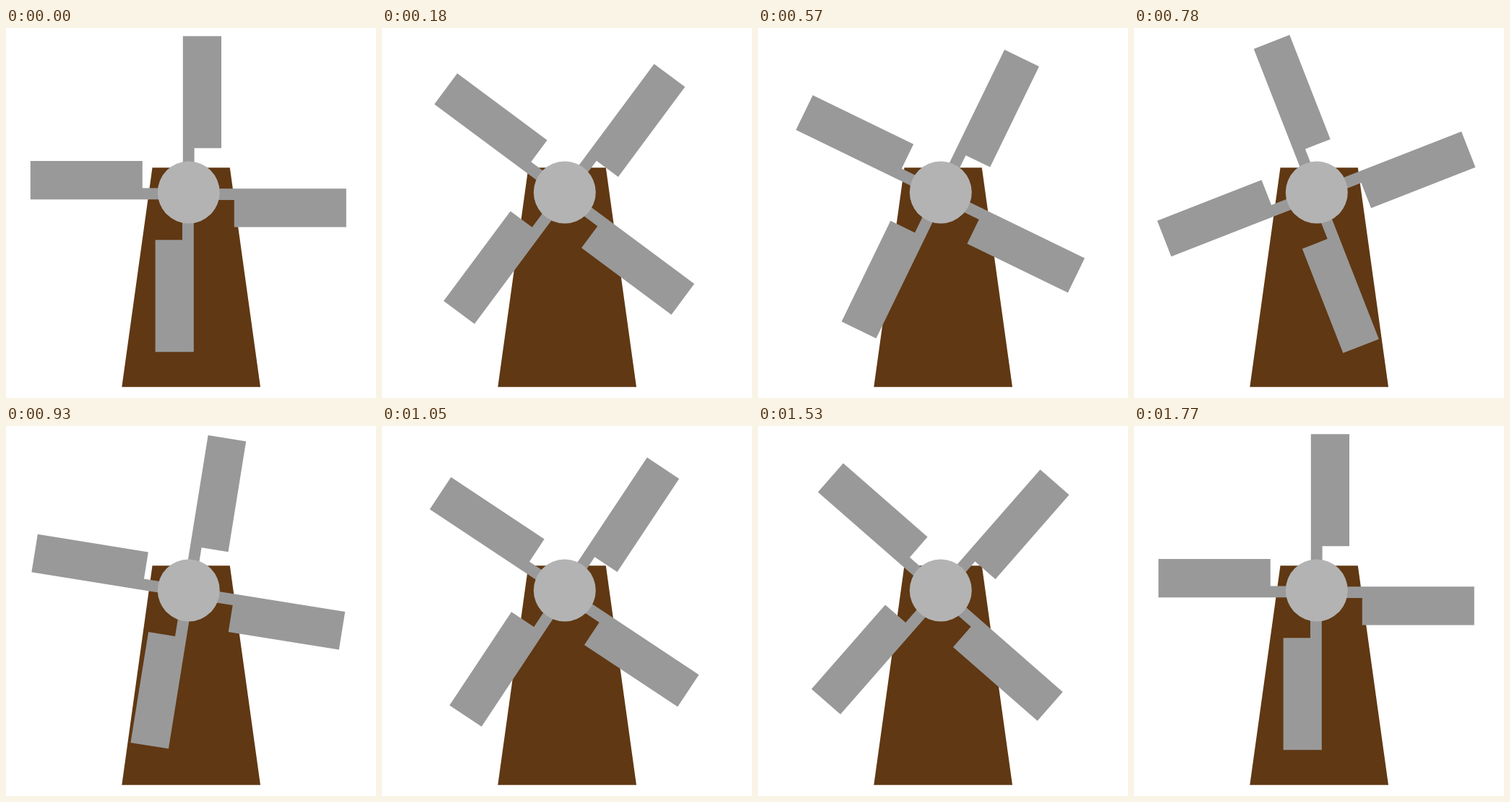
Write an HTML page that moves like this. It is 512 px wide and 512 px high and loops after 1800 ms.

```html
<!DOCTYPE html>
<html lang="en">
<head>
<meta charset="utf-8">
<title>Windmill</title>
<style>
  html, body { margin: 0; width: 100%; height: 100%; overflow: hidden; background: #fff; }
  svg { display: block; width: 100vw; height: 100vh; }
</style>
</head>
<body>
<svg viewBox="0 0 512 512">
  <defs>
    <path id="blade" d="M-7.5 0V-218.5H45.7V-63.5H8.3V0Z"/>
  </defs>
  <path fill="#603813" d="M202.5 193.3H309.8L352 496.8H160.3Z"/>
  <g id="sails" fill="#999">
    <use href="#blade"/>
    <use href="#blade" transform="rotate(90)"/>
    <use href="#blade" transform="rotate(180)"/>
    <use href="#blade" transform="rotate(270)"/>
  </g>
  <circle cx="252.8" cy="227.4" r="43" fill="#b3b3b3"/>
</svg>
<script>
  const STEP = 30, STEPS = 60;
  const sails = document.getElementById('sails');

  // The first and last steps share one pose, so a turn spans STEPS - 1 steps.
  function draw(now) {
    const step = Math.floor(now / STEP) % STEPS;
    const angle = 360 * step / (STEPS - 1);
    sails.setAttribute('transform', `translate(252.3 229.7) rotate(${angle})`);
  }

  const start = performance.now();
  function tick() {
    draw(performance.now() - start);
    requestAnimationFrame(tick);
  }
  tick();
</script>
</body>
</html>
```
